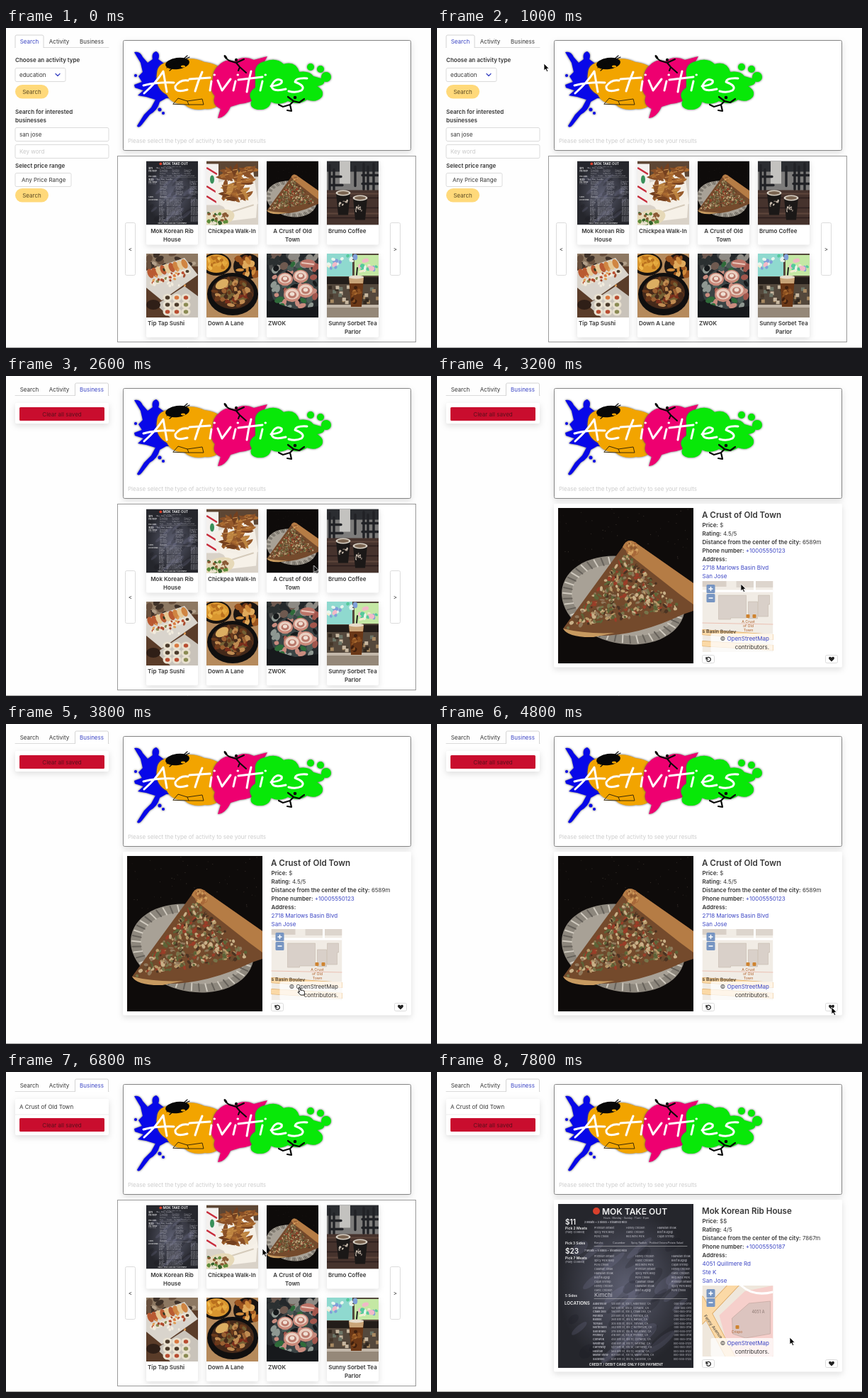
Animation, 600 px wide and 451 px high, one loop 8 s. Source, as an HTML page:

```html
<!DOCTYPE html>
<html lang="en">
<head>
<meta charset="utf-8">
<title>Activities</title>
<style>
html, body { margin: 0; width: 100%; height: 100%; overflow: hidden; background: #fefefe; }
#stage { display: block; width: 100%; height: 100%; font: 8px Inter, sans-serif; fill: #363636; }
.b { font-weight: 600; }
.link { fill: #3b45c4; }
.mid { text-anchor: middle; }
.end { text-anchor: end; }
.card { fill: #fff; filter: drop-shadow(0 3px 4px rgba(10,10,10,.13)); }
.box { fill: #fff; stroke: #dbdbdb; }
.splat { filter: drop-shadow(0 0 1.5px #555); }
.scene, #cursor { animation: 8s step-end infinite; }
#search { animation-name: search; }
#business { animation-name: business; }
#empty { animation-name: empty; }
.saved { animation-name: saved; }
#grid { animation-name: grid; }
#pizza { animation-name: pizza; }
#barbecue { animation-name: barbecue; }
.hover { animation-name: hover; }
.rest { animation-name: rest; }
#cursor { animation-name: move; }
@keyframes search { 0% { opacity: 1 } 20%, to { opacity: 0 } }
@keyframes business { 0% { opacity: 0 } 20%, to { opacity: 1 } }
@keyframes empty { 0% { opacity: 1 } 62.5%, to { opacity: 0 } }
@keyframes saved { 0% { opacity: 0 } 62.5%, to { opacity: 1 } }
@keyframes grid { 0%, 77.5% { opacity: 1 } 37.5%, 92.5%, to { opacity: 0 } }
@keyframes pizza { 0%, 77.5%, to { opacity: 0 } 37.5% { opacity: 1 } }
@keyframes barbecue { 0% { opacity: 0 } 92.5%, to { opacity: 1 } }
@keyframes hover { 0%, 50%, to { opacity: 0 } 47.5% { opacity: 1 } }
@keyframes rest { 0%, 50%, to { opacity: 1 } 47.5% { opacity: 0 } }
@keyframes move {
  0% { transform: translate(-30px, -30px) }
  5% { transform: translate(300px, 180px); animation-timing-function: steps(3) }
  12.5% { transform: translate(151px, 50px); animation-timing-function: steps(2) }
  17.5% { transform: translate(123px, 20px) }
  20% { transform: translate(123px, 20px); animation-timing-function: steps(5) }
  32.5% { transform: translate(434.5px, 267px) }
  37.5% { transform: translate(434.5px, 267px); animation-timing-function: steps(4) }
  47.5% { transform: translate(412px, 371px); animation-timing-function: steps(3) }
  55% { transform: translate(557px, 399px) }
  62.5% { transform: translate(557px, 398px); animation-timing-function: steps(3) }
  70% { transform: translate(419px, 388px); animation-timing-function: steps(2) }
  75% { transform: translate(382px, 398px) }
  77.5% { transform: translate(382px, 398px); animation-timing-function: steps(3) }
  85% { transform: translate(362px, 249px); animation-timing-function: steps(2) }
  90% { transform: translate(240px, 235px) }
  92.5% { transform: translate(240px, 235px); animation-timing-function: steps(2) }
  97.5%, to { transform: translate(498px, 374px) }
}
</style>
</head>
<body>
<svg id="stage" viewBox="0 0 600 451"></svg>
<script>
const text = (x, y, s, cls = '', attrs = '') => `<text x="${x}" y="${y}" class="${cls}" ${attrs}>${s}</text>`;
const rect = (x, y, w, h, fill, rx = 0, attrs = '') =>
  `<rect x="${x}" y="${y}" width="${w}" height="${h}" rx="${rx}" fill="${fill}" ${attrs}/>`;
const oval = (x, y, rx, ry, fill, turn = 0) =>
  `<ellipse cx="${x}" cy="${y}" rx="${rx}" ry="${ry}" fill="${fill}" transform="rotate(${turn} ${x} ${y})"/>`;
const shape = (d, fill, attrs = '') => `<path d="${d}" fill="${fill}" ${attrs}/>`;
const line = (d, color, width) =>
  `<path d="${d}" fill="none" stroke="${color}" stroke-width="${width}" stroke-linecap="round" stroke-linejoin="round"/>`;
const group = (id, body, cls = 'scene') => `<g ${id && `id="${id}"`} class="${cls}">${body}</g>`;
const box = (x, y, w, h, rx = 2) => `<rect class="box" x="${x}" y="${y}" width="${w}" height="${h}" rx="${rx}"/>`;
const card = (x, y, w, h) => `<rect class="card" x="${x}" y="${y}" width="${w}" height="${h}" rx="2"/>`;
const view = (x, y, w, h, body, vw = w, vh = h) =>
  `<svg x="${x}" y="${y}" width="${w}" height="${h}" viewBox="0 0 ${vw} ${vh}" preserveAspectRatio="xMidYMid slice">${body}</svg>`;
const repeat = (n, fn) => Array.from({ length: n }, (_, i) => fn(i)).join('');

let seed = 7;
const rand = (a = 0, b = 1) => a + (b - a) * ((seed = seed * 16807 % 2147483647) / 2147483647);
const pick = list => list[Math.floor(rand(0, list.length))];

// Banner
const splat = (fill, d, drops = []) =>
  group('', shape(d, fill) + drops.map(([x, y, r]) => oval(x, y, r, r, fill)).join(''), 'splat');
const splats =
  splat('#0808e8', 'M181 34Q189 32 193 41L200 49 207 44Q205 35 212 33 218 36 215 44L226 52 245 60V98L226 99 217 104Q214 116 203 122L192 136Q187 142 185 138L195 122 205 112 211 101 198 97 186 95 194 88 182 84 181 80 192 76 187 68 193 62 190 49Z', [[183, 67, 2], [217, 115, 2.5], [222, 120, 2]])
  + splat('#f2a400', 'M213 64Q214 46 240 47 262 39 280 48 300 50 307 62 313 82 305 100 299 116 281 114 263 118 251 107 234 108 227 94 210 85 213 64Z')
  + splat('#ee0070', 'M300 53Q310 42 322 47 336 38 350 45L369 40 361 54Q379 59 374 76 372 92 354 98 345 106 330 107L317 111Q310 126 299 127L303 114Q290 108 295 96 286 86 292 72 292 59 300 53Z')
  + splat('#08e808', 'M352 66Q350 50 366 47 382 41 392 51 409 46 414 62 428 60 434 68L448 72Q453 80 439 82 450 88 446 97 438 106 425 101 412 110 398 103 385 110 374 104 372 116 355 115 342 112 347 102 340 92 352 84Z', [[430, 55, 5], [444, 58, 5], [452, 69, 7]]);
const silhouettes =
  oval(242, 50, 17, 8, '#080808', -8) + oval(250, 54, 3, 1.5, '#f2a400')
  + line('M227 56L259 41M231 60L256 39', '#080808', 1.2)
  + line('M236 107L243 99 256 103 277 100 279 108 258 108ZM256 103L258 108', '#3a2a08', 1)
  + oval(325, 45, 2, 2.2, '#080808') + oval(310, 41, 1.6, 3.4, '#080808', -35)
  + line('M325 49L330 55 339 63M330 55L328 60M325 49L315 46 311 43M325 49L336 44', '#080808', 2)
  + oval(408, 98, 2.3, 2.3, '#080808')
  + line('M406 103L401 108 391 111 385 108M401 108L403 117 397 116M406 103L398 97M406 103L414 105 421 100', '#080808', 2.2);
const lettering = line('M195 92Q212 77 222 61L227 90M194 81Q214 76 237 77M257 74Q246 72 239 82 238 92 256 87M277 62Q271 75 267 89M259 72L288 70M290 75L288 88M294 66h.5M299 74L305 88 317 72M324 75L321 88M327 66h.5M346 61Q342 75 340 90M328 73L362 69M362 75L359 88M366 66h.5M374 82Q392 80 389 74 381 69 375 81 375 91 395 86M425 71Q409 70 408 76 424 82 417 88 409 92 399 89', '#fff', 3);
const banner = `<g><rect class="card" x="165.5" y="17.5" width="406" height="155" rx="2" stroke="#858585"/>`
  + splats + silhouettes + lettering
  + text(172, 162, 'Please select the type of activity to see your results', '', 'fill="#ccc"') + '</g>';

// Side panel
const tabs = active => {
  const names = [['Search', 33, 13, 40], ['Activity', 75, 54, 42], ['Business', 121, 97.5, 47]];
  const [, , x, w] = names[active];
  return line(`M13 27.5H145`, '#dbdbdb', 1)
    + shape(`M${x} 28V12q0-2 2-2h${w - 4}q2 0 2 2V28`, '#fff', 'stroke="#d4d4d4"')
    + names.map(([s, mid], i) => text(mid, 21.5, s, i === active ? 'mid link' : 'mid')).join('');
};
const pill = y => rect(13, y, 47, 19.5, '#ffd97a', 10) + text(36.5, y + 12.6, 'Search', 'mid', 'fill="#5a4a24"');
const search = tabs(0)
  + text(13, 48, 'Choose an activity type', 'b') + box(13, 56.5, 71, 19) + text(19, 69, 'education')
  + line('M70 64.5l3 3 3-3', '#3b45c4', 1.3) + pill(80)
  + text(13, 120.5, 'Search for interested', 'b') + text(13, 132.5, 'businesses', 'b')
  + box(13, 140.5, 132, 19) + text(19, 153, 'san jose')
  + box(13, 164.5, 132, 19) + text(19, 177, 'Key word', '', 'fill="#c8c8c8"')
  + text(13, 196.5, 'Select price range', 'b') + box(13, 204.5, 79, 19) + text(22, 217, 'Any Price Range') + pill(226);
const clearButton = y => rect(19, y, 120, 19, '#c90d2e', 1.5) + text(79, y + 12.5, 'Clear all saved', 'mid', 'fill="#5c0f1c"');
const business = tabs(2)
  + group('empty', card(13, 38, 132, 29) + clearButton(44))
  + group('', card(13, 38, 132, 51) + text(19, 52, 'A Crust of Old Town') + line('M13 60H145', '#ededed', 1) + clearButton(65), 'scene saved');

// Pictures
const dabs = (n, [x1, x2], [y1, y2], [r1, r2], colors) =>
  repeat(n, () => oval(rand(x1, x2), rand(y1, y2), rand(r1, r2), rand(r1, r2) * .7, pick(colors), rand(0, 180)));
const crumbs = ['#6b4a2e', '#9a3d28', '#77744a', '#b89a6a', '#4a3322', '#91795c', '#5d6438', '#c9b088'];
const pizzaPhoto = rect(0, 0, 191, 219, '#0e0b0a')
  + dabs(60, [0, 191], [0, 80], [.4, .8], ['#3a332e'])
  + oval(92, 130, 88, 61, '#8d877d', 12) + oval(94, 130, 76, 49, '#a8a196', 12)
  + `<g transform="rotate(12 92 130)">` + repeat(48, i => {
    const a = i * Math.PI / 24, c = Math.cos(a), s = Math.sin(a);
    return line(`M${92 + 74 * c} ${130 + 49 * s}L${92 + 86 * c} ${130 + 59 * s}`, i % 2 ? '#d0cabf' : '#66615a', 2);
  }) + '</g>'
  + shape('M7 170L91 55Q97 42 108 48L191 106V145L176 150Q110 182 50 180 14 182 7 170Z', '#744a2c')
  + shape('M91 55Q97 42 108 48L191 106V136L172 122 106 70Z', '#b57c45')
  + dabs(30, [98, 112], [50, 66], [1, 4], ['#8f5a30', '#d3a060', '#a8693a'])
  + repeat(480, () => {
    const u = Math.sqrt(rand()), v = rand();
    return oval(12 + u * (84 + 78 * v), 170 - u * (106 - 78 * v), rand(1.5, 4), rand(1, 2.6), pick(crumbs), rand(0, 180));
  })
  + shape('M7 170Q40 178 80 176L50 182Q14 183 7 170Z', '#c79a60');

const menuItems = ['Premium Brisket', 'Honey Chicken', 'Hawaiian Steak', 'Spicy Pork Belly', 'Garlic Chicken', 'Beef Bulgogi', 'Pork Cheek', 'Red Wine Pork', 'Cajun Shrimp', 'Calamari Steak'];
const towns = ['Aldermoor', 'Corvane', 'Chalk Dell', 'Fennick', 'Ranloe', 'Torvale', 'Northmere', 'San Bravo', 'Fremley', 'Conwick', 'Westhay', 'Carrowby', 'Hestow', 'Marsh View', 'Sackville'];
const chalk = (x, y, s, size, cls = '') => text(x, y, s, cls, `font-size="${size}" fill="${size > 4.5 ? '#f4f4f4' : '#c4c4cc'}"`);
const items = (y, rows, xs) => repeat(rows, r => xs.map((x, c) => chalk(x, y + r * 6, menuItems[(r * 3 + c) % 10], 3.7)).join(''));
const menuPhoto = '<radialGradient id="slate"><stop stop-color="#5c5e70"/><stop offset="1" stop-color="#25262c"/></radialGradient>'
  + rect(0, 0, 191, 231, 'url(#slate)')
  + repeat(40, () => oval(rand(20, 175), rand(50, 215), rand(8, 24), rand(3, 9), pick(['rgba(150,152,185,.16)', 'rgba(20,20,28,.2)']), -40))
  + oval(54, 10, 5, 5, '#d8402c') + chalk(62, 15, 'MOK TAKE OUT', 12, 'b')
  + chalk(96, 21, 'Hours : Monday - Sunday : 11 am - 8 pm', 3.4, 'mid')
  + chalk(10, 29, '$11', 10, 'b') + chalk(10, 36, 'Pick 2 Meats', 5, 'b') + chalk(10, 41, '(Fully Cooked)', 4)
  + chalk(37, 27, '2 Meats + 3 Sides + Steamed Rice', 3.7, 'b') + items(35, 3, [51, 96, 140])
  + chalk(10, 57, 'Pick 3 Sides', 4.8, 'b')
  + ['Kimchi', 'Cucumber', 'Spicy Radish', 'Pickled Onions', 'Potato Salad'].map((s, i) => chalk(51 + i * 26, 56, s, 3.6)).join('')
  + line('M51 59.5H182M51 133.5H182', '#bbb', .6)
  + chalk(10, 70, '$23', 10, 'b') + chalk(10, 78, 'Pick 7 Meats', 5, 'b') + chalk(10, 83, '(Fully Cooked)', 4)
  + chalk(37, 67, '7 Meats + 5 Sides + Steamed Rice', 3.7, 'b') + items(75, 9, [51, 109, 160])
  + chalk(51, 131, 'Kimchi') + chalk(10, 131, '5 Sides', 4.8, 'b') + chalk(9, 142, 'LOCATIONS', 6.2, 'b')
  + towns.map((town, i) => {
    const y = 142 + i * 5.55;
    return chalk(49, y, town, 3.8, 'b') + chalk(75, y, `${120 + i * 37} Elm St, Ste ${i + 1}, ${town}, CA`, 3.7)
      + chalk(188, y, `000-555-01${10 + i}`, 3.7, 'end');
  }).join('') + chalk(96, 228, 'CREDIT / DEBIT CARD ONLY FOR PAYMENT', 5, 'b mid');

const wedge = (x, y, turn, fill) => shape('M-11 2Q-3-7 11-3 6 5-11 2Z', fill, `transform="translate(${x} ${y}) rotate(${turn})"`)
  + line(`M${x - 3} ${y - 1}l6-1`, '#d29a58', 1);
const friesPhoto = rect(0, 0, 73, 90, '#d9d2c8') + rect(0, 0, 73, 22, '#5d4634') + rect(0, 4, 17, 58, '#f3f0ee')
  + line('M1 10L14 18M1 36L14 44M1 50L14 58', '#c72c3c', 2.5) + oval(8, 26, 3, 6, '#39905a')
  + shape('M12 32L66 14 73 60 46 74 14 60Z', '#f4efe6')
  + repeat(46, () => wedge(rand(24, 64), rand(10, 54), rand(-80, 70), pick(['#8a5128', '#a9692f', '#74401f', '#bd8440', '#965a2b'])))
  + shape('M12 44L28 60 52 66 72 52 70 80 36 84Z', '#f6f1e8') + line('M34 72L66 62', '#d5cbbb', 2)
  + oval(17, 81, 23, 12, '#e6d9b8', -15)
  + dabs(34, [3, 32], [73, 89], [1.5, 3.5], ['#5f8d3a', '#8a5a34', '#e8e0cc', '#34622a']);

const coffeeCup = (x, y) => shape(`M${x - 10} ${y}h20l-3 31h-14z`, '#1b1817') + oval(x, y, 10.5, 4, '#d9d1c5') + oval(x, y, 8, 2.6, '#7b6552')
  + dabs(9, [x - 6, x + 6], [y + 11, y + 20], [1, 2.2], ['#c9bcae', '#857a70']);
const coffeePhoto = rect(0, 0, 73, 90, '#7d7c7b') + rect(0, 0, 73, 15, '#2b2d31') + rect(18, 0, 15, 32, '#c3c2bf')
  + line('M4 6V42M10 12V42M4 22H20M4 34H22M52 4V40M58 8V40M66 4V42M50 20H72M50 32H72M40 8V35', '#212226', 3.4)
  + rect(0, 41, 73, 49, '#46332d') + line('M0 52H73M0 66H73M0 80H73', '#2a1e1c', 1.5) + line('M0 46H73M0 74H73', '#5e463c', 2)
  + coffeeCup(23, 45) + coffeeCup(47, 52);

const roll = (x, y, r) => oval(x, y, r, r * .85, '#e9e1d0') + oval(x, y, r * .5, r * .42, pick(['#d9773e', '#8a8a52', '#b84c30', '#4a3a2a']));
const sushiPhoto = rect(0, 0, 73, 90, '#5a3c29') + rect(0, 0, 73, 18, '#8d7862') + dabs(14, [0, 73], [0, 18], [3, 7], ['#3e3128', '#b3a08a', '#68503e'])
  + shape('M0 24L54 6 73 30 22 66 0 48Z', '#d9d4cc')
  + repeat(9, i => oval(6 + i * 6, 28 - i * 1.7, 4, 7, pick(['#d08542', '#b95a32', '#e6c894']), -25) + roll(10 + i * 6, 41 - i * 2, 5))
  + dabs(20, [6, 56], [22, 46], [1.5, 3], ['#f2ecde', '#a5492c', '#2f3a24', '#e09a50'])
  + shape('M14 72L54 46 73 60V90H34Z', '#c9c3ba') + repeat(9, i => roll(30 + i % 3 * 13, 62 + Math.floor(i / 3) * 10, 6.5)) + oval(10, 72, 10, 7, '#2f1f17');

const stewPhoto = rect(0, 0, 73, 90, '#b58a5c') + oval(14, 15, 21, 16, '#18130f') + oval(14, 14, 18, 13, '#d9962f')
  + dabs(24, [2, 26], [5, 22], [2, 4], ['#f0b94c', '#b9701e', '#e3a63c'])
  + oval(58, 18, 20, 18, '#1b1512') + dabs(20, [45, 70], [7, 30], [3, 7], ['#9b541f', '#cf8a3a', '#6e3416', '#e0aa5c'])
  + oval(37, 57, 36, 30, '#100f0f') + oval(37, 55, 30, 23, '#44291a')
  + repeat(85, () => {
    const a = rand(0, 6.28), r = Math.sqrt(rand());
    return oval(37 + 26 * r * Math.cos(a), 55 + 19 * r * Math.sin(a), rand(2, 6), rand(1.5, 4), pick(['#6b3b1c', '#9a6032', '#45291a', '#c08c52', '#7b2f1c', '#746034']), rand(0, 180));
  }) + oval(22, 43, 10, 6, '#dcae62', -30);

const swirl = (x, y, r) => oval(x, y, r, r * .85, '#c9897a') + oval(x, y - 1, r * .8, r * .62, '#ead0c2') + oval(x, y, r * .5, r * .4, '#b9786a') + oval(x, y - 1, r * .28, r * .22, '#f0e0d4');
const rollsPhoto = rect(0, 0, 73, 90, '#24282b') + dabs(24, [0, 73], [0, 20], [4, 9], ['#4a4c4c', '#6f5a50', '#2b3031', '#8d8a84'])
  + oval(40, 49, 34, 30, '#3b4445', -30)
  + dabs(50, [8, 70], [12, 76], [3, 7], ['#2f6b3a', '#8f9892', '#a2564c', '#16191b', '#c98b7e', '#4d5d58'])
  + swirl(26, 36, 11) + swirl(48, 32, 11) + swirl(55, 52, 12) + swirl(36, 58, 12)
  + oval(58, 14, 11, 6, '#bd7468') + line('M50 13L66 15', '#e8c8bc', 2) + shape('M0 66L40 78 73 74V90H0Z', '#17191c');

const teaPhoto = rect(0, 0, 73, 90, '#54483c') + rect(0, 0, 36, 32, '#8fd9cf') + rect(39, 2, 34, 29, '#c4e8a4')
  + dabs(26, [2, 70], [3, 29], [2, 5], ['#f1b9c7', '#56c99b', '#f3ecd0', '#7f9fd8', '#e8f6ee'])
  + rect(0, 33, 73, 10, '#231d19') + repeat(34, () => rect(rand(0, 70), rand(42, 68), 5, 5, pick(['#a78962', '#6c7466', '#32281f', '#c7b7a0', '#443628'])))
  + rect(0, 72, 73, 18, '#958879') + rect(0, 72, 73, 4, '#c3b8aa') + line('M43 20L41 40', '#222', 2)
  + shape('M31 33H52L49 75H34Z', '#6b3817') + shape('M31 33H52L51 42H32Z', '#c9a478') + oval(41.5, 33, 10.5, 2.6, '#e8ddcc')
  + dabs(12, [36, 47], [46, 70], [2, 4], ['#8c5020', '#a86a30', '#3f200f']);

// Results
const places = [
  [['Mok Korean Rib', 'House'], menuPhoto, 191, 231], [['Chickpea Walk-In'], friesPhoto],
  [['A Crust of Old', 'Town'], pizzaPhoto, 191, 219], [['Brumo Coffee'], coffeePhoto],
  [['Tip Tap Sushi'], sushiPhoto], [['Down A Lane'], stewPhoto],
  [['ZWOK'], rollsPhoto], [['Sunny Sorbet Tea', 'Parlor'], teaPhoto]];
const grid = rect(157.5, 180.5, 421, 262, '#fff', 0, 'stroke="#999"')
  + box(168.5, 274.5, 14, 74) + text(175.5, 314.5, '&lt;', 'mid') + box(542.5, 274.5, 14, 74) + text(549.5, 314.5, '&gt;', 'mid')
  + places.map(([label, photo, w = 73, h = 90], i) => {
    const x = 198 + i % 4 * 85, y = i < 4 ? 187.5 : 318;
    const lines = label.length > 1
      ? label.map((s, n) => text(x + 36.5, y + 101 + n * 12, s, 'b mid')).join('')
      : text(x + 2, y + 101, label[0], 'b');
    return card(x, y, 73, 118) + view(x, y, 73, 90, photo, w, h) + lines;
  }).join('');

// Detail pages
const mapPizza = rect(0, 0, 100, 100, '#f1ece5') + rect(0, 0, 34, 8, '#d9d0c7') + rect(48, 0, 52, 9, '#ddd5cd') + line('M0 14H100M74 0V14', '#fff', 3)
  + '<g stroke="#c5b9ae" stroke-width=".6">' + shape('M23 20H62V52H40V54H23ZM65 29H78V53H65ZM79 20H95V33H93V50H79Z', '#d9d0c9') + '</g>'
  + line('M0 59L100 61', '#e8ac9c', .7) + line('M-2 72L102 79M-2 88L102 94', '#d9a35c', 8) + line('M-2 72L102 79M-2 88L102 94', '#fbd9a6', 6.6)
  + rect(62, 47, 5, 5, '#cf8430', 1) + rect(71, 47, 5, 5, '#cf8430', 1)
  + ['A Crust', 'of Old', 'Town'].map((s, i) => text(65, 59 + i * 6, s, 'mid', 'font-size="5.3" fill="#b0602a"')).join('')
  + text(0, 73, 's Basin Boulev', 'b', 'font-size="6.8" fill="#4a3a28" transform="rotate(1 0 73)"');
const mapBarbecue = rect(0, 0, 100, 100, '#efe7dc') + shape('M24 42L60 8 100 0V100H40Z', '#f6cfcb')
  + line('M-5 51L48 -5M-3 20L42 105', '#d9a35c', 13) + line('M-5 51L48 -5M-3 20L42 105', '#fbd9a6', 11.5)
  + shape('M42 46L66 25 96 22V68L61 74 43 68Z', '#dcc4bf', 'stroke="#c3a7a0" stroke-width=".7"')
  + line('M55 0Q72 16 100 9', '#fff', 3) + text(79, 39, '4051 A', 'mid', 'font-size="5.5" fill="#88746e"')
  + rect(47, 56, 5, 5, '#cf8430', 1) + text(49, 67, 'Crispo', 'mid', 'font-size="5" fill="#b0602a"')
  + text(2, 43, 'Fenny Avenue', '', 'font-size="6" transform="rotate(54 2 43)"');
const zoom = (y, sign) => rect(6, y, 12, 12, '#7795c2', 1.5) + line(`M9.5 ${y + 6}h5` + (sign === '+' ? `M12 ${y + 3.5}v5` : ''), '#fff', 1.5);
const credit = (y, cls) => text(469, y, `© <tspan class="${cls}">OpenStreetMap</tspan>`, 'end');
const detail = ({ name, price, rating, distance, phone, address, photo, map, hoverable }) => {
  const mapY = 265 + address.length * 12, bottom = mapY + 116, h = bottom - 186;
  const field = (row, key, value, cls = '') => text(374.5, 213 + row * 12, `<tspan class="b">${key}:</tspan> <tspan class="${cls}">${value}</tspan>`);
  return card(165, 180, 407, bottom - 174.5) + view(171, 186, 191, h, photo)
    + text(374, 199.5, name, 'b', 'font-size="11.6"')
    + field(0, 'Price', price) + field(1, 'Rating', rating) + field(2, 'Distance from the center of the city', distance)
    + field(3, 'Phone number', phone, 'link') + field(4, 'Address', '')
    + address.map((s, i) => text(374.5, 273 + i * 12, s, 'link')).join('')
    + view(374.5, mapY, 100, 100, map + zoom(5, '+') + zoom(18, '-') + rect(12, 74, 88, 26, 'rgba(255,255,255,.75)', 2))
    + (hoverable ? group('', credit(mapY + 84, 'link'), 'scene rest') + group('', credit(mapY + 84, ''), 'scene hover') : credit(mapY + 84, 'link'))
    + text(469, mapY + 96, 'contributors.', 'end')
    + box(374.5, mapY + 104.5, 17, 11) + line(`M380 ${mapY + 107.5}v2.6h2.6M380.4 ${mapY + 109.6}a3 3 0 1 1 .4 2.4`, '#222', 1.3)
    + box(548.5, mapY + 104.5, 17, 11)
    + (hoverable ? group('', rect(548.5, mapY + 104.5, 17, 11, '#fff', 2, 'stroke="#5560c8" stroke-width="1.5"'), 'scene saved') : '')
    + shape(`M557 ${mapY + 113.6}l-3.6-3.6q-1-2.7 1.2-3.2 1.6 0 2.4 1.3.8-1.3 2.4-1.3 2.2.5 1.2 3.2z`, '#222');
};
const pizza = detail({
  name: 'A Crust of Old Town', price: '$', rating: '4.5/5', distance: '6589m', phone: '+10005550123',
  address: ['2718 Marlows Basin Blvd', 'San Jose'], photo: pizzaPhoto, map: mapPizza, hoverable: true });
const barbecue = detail({
  name: 'Mok Korean Rib House', price: '$$', rating: '4/5', distance: '7867m', phone: '+10005550187',
  address: ['4051 Quillmere Rd', 'Ste K', 'San Jose'], photo: menuPhoto, map: mapBarbecue });

const outline = 'stroke="#fff" stroke-width=".8"';
const cursor = group('', shape('M0 0V10L2.3 7.9 4 11.6 5.7 10.8 4.1 7.2H7.2Z', '#000', outline), 'scene rest')
  + group('', shape('M1 1Q2-.5 3 1L4 4.5 6 4 7.5 4.7 9 5.2Q10 7 9 11H4L0 7Q0 5.6 2.4 7Z', '#fff', 'stroke="#000" stroke-width=".9"'), 'scene hover');

document.getElementById('stage').innerHTML = group('search', search) + group('business', business) + banner
  + group('grid', grid) + group('pizza', pizza) + group('barbecue', barbecue)
  + line('M0 450.5H600', '#a0a0a0', 1) + group('cursor', cursor, '');
</script>
</body>
</html>
```
